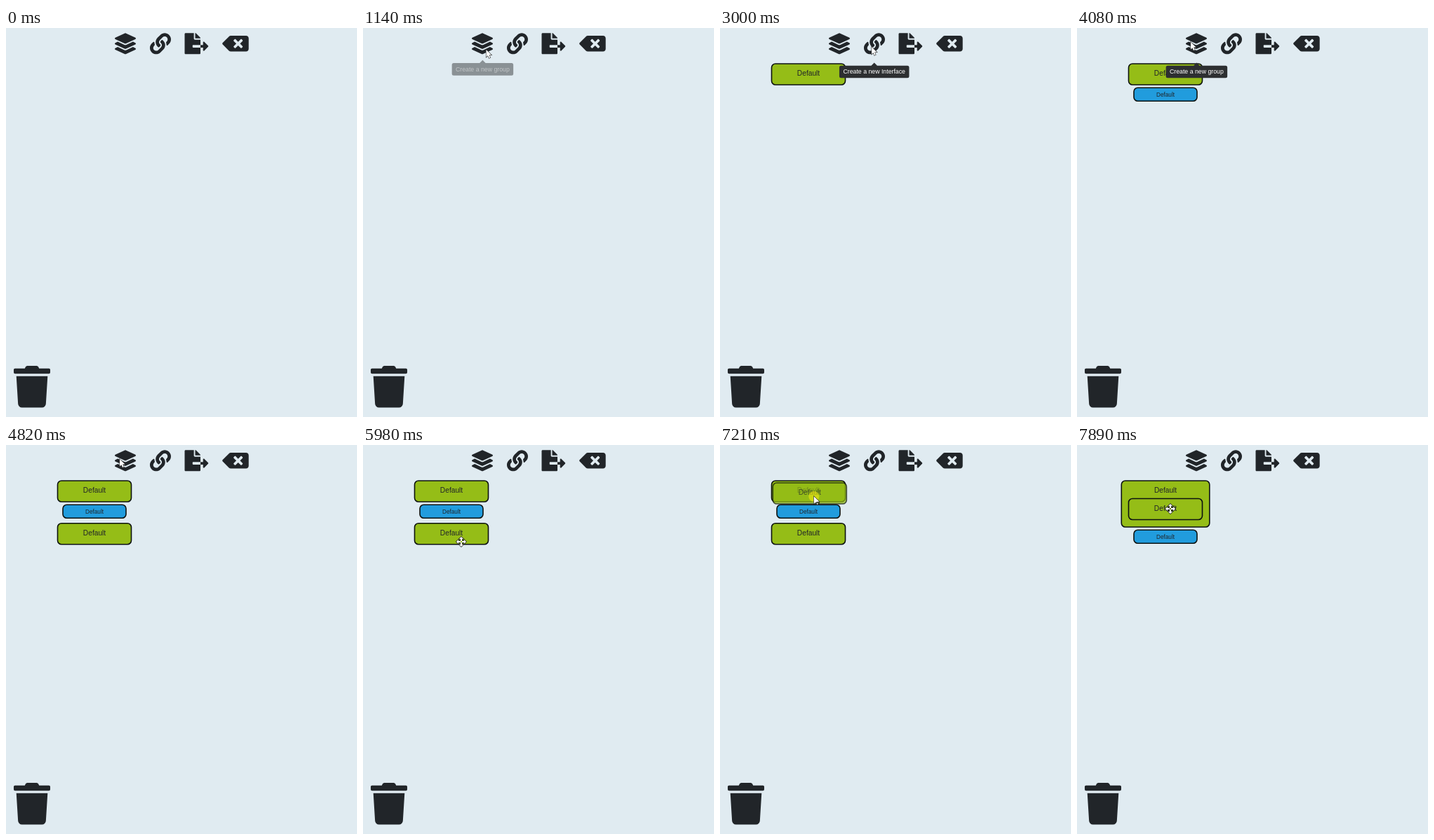
These frames come from a looping animation (500 by 555 pixels, 7990 ms). An HTML page with a canvas:

```html
<!DOCTYPE html>
<html>
<head>
<meta charset="utf-8">
<style>
  html, body { margin: 0; width: 100%; height: 100%; overflow: hidden; background: #e0ebf1; }
  canvas { display: block; }
</style>
</head>
<body>
<canvas id="stage" width="500" height="555"></canvas>
<script>
const ctx = document.getElementById('stage').getContext('2d');
const LOOP = 7990, INK = '#212529', GREEN = '#95bd17', BLUE = '#219cdd';

const layerTop = new Path2D('M12.4 148l233 105.7c6.8 3.1 14.5 3.1 21.3 0l233-105.7c16.5-7.5 16.5-32.5 0-40L266.7 2.3a25.6 25.6 0 0 0-21.3 0L12.4 108c-16.5 7.5-16.5 32.5 0 40z');
const layerEdge = new Path2D('M499.6 236.3l-58.1-26.3-161.6 73.2c-7.6 3.4-15.6 5.2-23.9 5.2s-16.3-1.8-23.9-5.2L70.5 210l-58.1 26.3c-16.5 7.5-16.5 32.5 0 40l233 105.6c6.8 3.1 14.5 3.1 21.3 0l233-105.6c16.5-7.5 16.5-32.5 0-40z');
const chainHalf = new Path2D('M326.6 185.4c59.8 59.8 58.9 155.7.4 214.6l-.4.4-67.2 67.2c-59.3 59.2-155.7 59.2-215 0-59.2-59.3-59.2-155.7 0-215l37.1-37.1c9.9-9.9 26.8-3.3 27.3 10.6.7 17.7 3.8 35.5 9.7 52.7 2 5.8.6 12.3-3.8 16.6l-13.1 13.1c-28 28-28.9 73.7-1.1 102 28 28.6 74.1 28.7 102.3.5l67.2-67.2c28.2-28.2 28.1-73.8 0-101.8-3.7-3.7-7.4-6.6-10.3-8.6a16 16 0 0 1-7-12.6c-.4-10.6 3.4-21.5 11.7-29.8l21.1-21.1c5.5-5.5 14.2-6.2 20.6-1.7a152 152 0 0 1 20.5 17.2z');
const fileExport = new Path2D('M384 121.9c0-6.3-2.5-12.4-7-16.9L279.1 7c-4.5-4.5-10.6-7-17-7H256v128h128zM571 308l-95.7-96.4c-10.1-10.1-27.4-3-27.4 11.3V288h-64v64h64v65.2c0 14.3 17.3 21.4 27.4 11.3L571 332c6.6-6.6 6.6-17.4 0-24zm-379 28v-32c0-8.8 7.2-16 16-16h176V160H248c-13.2 0-24-10.8-24-24V0H24C10.7 0 0 10.7 0 24v464c0 13.3 10.7 24 24 24h336c13.3 0 24-10.7 24-24V352H208c-8.8 0-16-7.2-16-16z');
const backspace = new Path2D('M576 64H205.3A64 64 0 0 0 160 82.7L9.4 233.4c-12.5 12.5-12.5 32.7 0 45.2L160 429.3c12 12 28.3 18.7 45.3 18.7H576c35.3 0 64-28.7 64-64V128c0-35.3-28.7-64-64-64zm-84.7 254c6.3 6.3 6.3 16.4 0 22.7l-22.6 22.6c-6.3 6.3-16.4 6.3-22.7 0L384 301.3l-62 62c-6.3 6.3-16.4 6.3-22.7 0l-22.6-22.6c-6.3-6.3-6.3-16.4 0-22.7l62-62-62-62c-6.3-6.3-6.3-16.4 0-22.7l22.6-22.6c6.3-6.3 16.4-6.3 22.7 0l62 62 62-62c6.3-6.3 16.4-6.3 22.7 0l22.6 22.6c6.3 6.3 6.3 16.4 0 22.7l-62 62z');
const trash = new Path2D('M432 32H312l-9.4-18.7A24 24 0 0 0 281 0H167a24 24 0 0 0-21.6 13.3L136 32H16A16 16 0 0 0 0 48v32a16 16 0 0 0 16 16h416a16 16 0 0 0 16-16V48a16 16 0 0 0-16-16zM53.2 467a48 48 0 0 0 47.9 45h245.8a48 48 0 0 0 47.9-45L416 128H32z');
const arrow = new Path2D('M0 0V10.5L2.4 8.3 4 12 5.8 11.2 4.2 7.6 7.5 7.5Z');

const moveCross = new Path2D();
for (let i = 0; i < 4; i++) {
  const arm = new Path2D('M-1 -1V-4H-3L0 -7 3 -4H1V-1');
  moveCross.addPath(arm, new DOMMatrix().rotate(i * 90));
}

// Pointer track: time, x, y
const track = [
  [210, 473, 535], [740, 262, 186], [820, 195, 107], [900, 182, 82], [980, 176, 53],
  [1060, 176, 38], [1140, 175.5, 31], [1460, 174, 24.5], [2600, 174, 25], [2860, 212, 28],
  [3000, 216, 27], [3560, 216, 27], [4000, 162, 20], [5330, 162, 20], [5600, 165, 55],
  [5800, 155, 110], [5980, 140, 138], [6130, 136, 135], [6210, 132, 131], [6670, 134.5, 92],
  [6910, 134, 75], [7170, 134, 75], [7270, 133.5, 71], [7760, 133, 71], [7870, 133, 91]
];
const clicks = [2070, 3380, 4490];
const DRAG = 6210, DROP = 7520;

const ramp = (t, from, to) => Math.min(1, Math.max(0, (t - from) / (to - from)));

function pointer(t) {
  const i = track.findIndex(k => k[0] > t);
  if (i < 0) return track[track.length - 1].slice(1);
  const [t0, x0, y0] = track[i - 1], [t1, x1, y1] = track[i];
  const p = ramp(t, t0, t1);
  return [x0 + (x1 - x0) * p, y0 + (y1 - y0) * p];
}

function icon(x, y, scale, ...paths) {
  ctx.save();
  ctx.translate(x, y);
  ctx.scale(scale, scale);
  ctx.fillStyle = INK;
  paths.forEach(p => ctx.fill(p));
  ctx.restore();
}

function toolbar() {
  const s = 30 / 512;
  const lower = new Path2D(), chain = new Path2D(chainHalf);
  lower.addPath(layerEdge, new DOMMatrix().translate(0, 127.8));
  chain.addPath(chainHalf, new DOMMatrix([-1, 0, 0, -1, 512, 512]));
  icon(155, 7.3, s, layerTop, layerEdge, lower);
  icon(205, 7.3, s, chain);
  icon(254.5, 7.3, s, fileExport);
  icon(308.2, 7.3, s, backspace);
  icon(11, 482, 52 / 448, trash);
}

function label(text, x, y, size, color) {
  ctx.font = `${size}px "Liberation Sans", Arial, sans-serif`;
  ctx.textAlign = 'center';
  ctx.fillStyle = color;
  ctx.fillText(text, x, y);
}

function box(x, y, w, h, color, size, baseline) {
  ctx.beginPath();
  ctx.roundRect(x, y, w, h, 5.5);
  ctx.fillStyle = color;
  ctx.fill();
  ctx.strokeStyle = '#0d1210';
  ctx.lineWidth = 1.6;
  ctx.stroke();
  label('Default', x + w / 2, y + baseline, size, INK);
}

const group = (x, y, h = 30) => box(x, y, 105, h, GREEN, 10.2, 17.4);
const link = y => box(81, y, 90, 19, BLUE, 8.2, 12.5);

function tooltip(text, cx, w, t, start, end) {
  const shown = ramp(t, start, start + 170), alpha = shown * (1 - ramp(t, end, end + 170));
  if (!alpha) return;
  ctx.save();
  ctx.globalAlpha = alpha;
  ctx.translate(cx, 53.7 - 7 * (1 - shown));
  ctx.fillStyle = '#2d2f31';
  ctx.beginPath();
  ctx.roundRect(-w / 2, 0, w, 17.6, 2.5);
  ctx.moveTo(-4.5, 0.2);
  ctx.lineTo(0, -4.2);
  ctx.lineTo(4.5, 0.2);
  ctx.fill();
  label(text, 0, 11.7, 8.75, '#fff');
  ctx.restore();
}

function cursor(t) {
  if (t < 210) return;
  const [x, y] = pointer(t), dragging = t >= DRAG && t < DROP;
  const overBox = t > 5000 && y > 50 && !dragging;
  ctx.save();
  ctx.translate(x, y);
  if (dragging || clicks.some(c => t >= c && t < c + 160)) {
    ctx.beginPath();
    ctx.arc(0, 0, 7.5, 0, 2 * Math.PI);
    ctx.fillStyle = 'rgba(240,232,20,.6)';
    ctx.fill();
  }
  const shape = overBox ? moveCross : arrow;
  ctx.lineWidth = overBox ? 1.5 : 1.1;
  ctx.strokeStyle = '#222';
  ctx.fillStyle = '#fff';
  ctx.stroke(shape);
  ctx.fill(shape);
  if (dragging) ctx.strokeRect(3.5, 8.5, 4, 3.5);
  ctx.restore();
}

function draw(t) {
  ctx.fillStyle = '#e0ebf1';
  ctx.fillRect(0, 0, 500, 555);
  toolbar();

  if (t >= DROP) {
    box(63.3, 51, 125.5, 66, GREEN, 10.2, 17.4);
    group(73.5, 76.5);
    link(121.3);
  } else {
    if (t >= 2150) group(73.5, 51);
    if (t >= 3460) link(85.2);
    if (t >= 4570) group(73.5, 111.7);
  }
  if (t >= DRAG && t < DROP) {
    const [x, y] = pointer(t);
    ctx.globalAlpha = 0.72;
    group(73.5 + x - 132, 111.7 + y - 131);
    ctx.globalAlpha = 1;
  }

  tooltip('Create a new group', 170.4, 87.5, t, 1060, 2150);
  tooltip('Create a new Interface', 219.7, 99.5, t, 2720, 3460);
  tooltip('Create a new group', 170.4, 87.5, t, 3860, 4570);
  cursor(t);
}

function frame() {
  draw(performance.now() % LOOP);
  requestAnimationFrame(frame);
}
frame();
</script>
</body>
</html>
```
